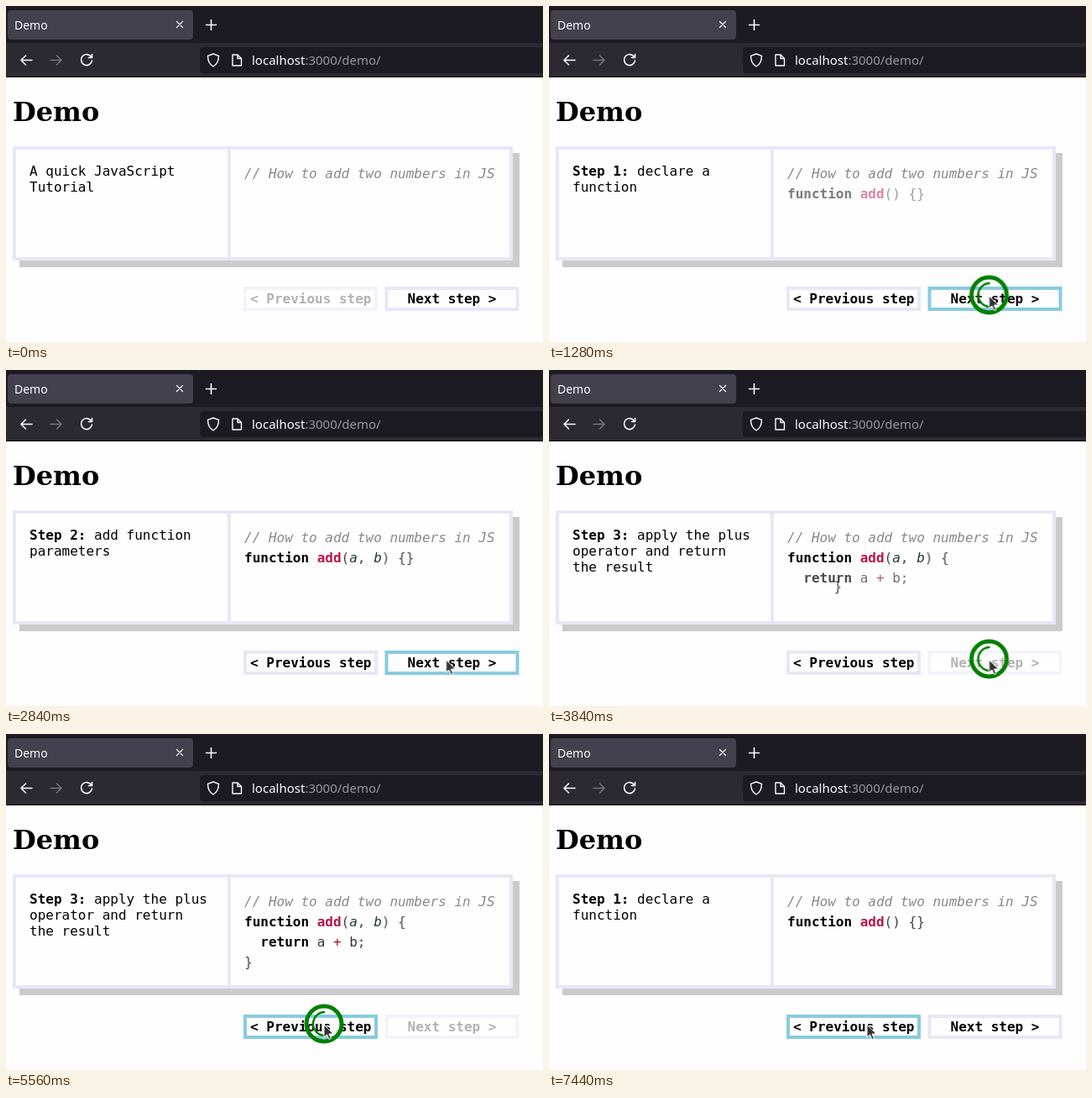
An HTML page for the animation above (8 s loop, 640 by 400 pixels).

```html
<!DOCTYPE html>
<html lang="en">
<head>
<meta charset="utf-8">
<title>Demo</title>
<style>
  html, body { margin: 0; width: 100%; height: 100%; overflow: hidden; background: #fefefe; }
  svg { display: block; width: 100%; height: 100%; }
  text { white-space: pre; }
  .ui { font-family: "Ubuntu", "Noto Sans", sans-serif; fill: #fbfbfe; }
  .mono { font: 16px "DejaVu Sans Mono", monospace; fill: #000; }
  .bold, .keyword, .name { font-weight: bold; }
  .comment { fill: #888; font-style: italic; }
  .keyword { fill: #000; }
  .name { fill: #b8144c; }
  .param { fill: #1e3a2a; font-style: italic; }
  .punct { fill: #444; }
  .plain { fill: #333; }
  .operator { fill: #a01828; }
  .line { fill: none; stroke: #fbfbfe; stroke-width: 1.6; stroke-linecap: round; stroke-linejoin: round; }
  .frame { fill: #fefefe; stroke: #e8e7f7; stroke-width: 4; }
</style>
</head>
<body>
<svg viewBox="0 0 640 400">
  <!-- Browser chrome -->
  <rect width="640" height="44" fill="#1c1b22"/>
  <rect y="44" width="640" height="41" fill="#2b2a33"/>
  <rect y="84" width="640" height="1" fill="#0c0c0d"/>
  <rect x="2" y="5" width="221" height="35" rx="4" fill="#42414d"/>
  <rect x="231" y="49" width="420" height="31" rx="4" fill="#1c1b22"/>
  <text class="ui" x="10" y="28" font-size="14">Demo</text>
  <text class="ui" x="293" y="70" font-size="15">localhost<tspan fill="#98979f">:3000/demo/</tspan></text>
  <g class="line">
    <path d="M203.5 18.5l7 7m0-7l-7 7" stroke-width="1.2"/>
    <path d="M238.5 22.5h12m-6-6v12"/>
    <path d="M31 64.5H18m5.5-5.5l-5.5 5.500 5.500 5.500"/>
    <path d="M53 64.5h13m-5.5-5.5l5.500 5.500-5.500 5.500" stroke="#75747c"/>
    <path d="M101.5 60.5a6.500 6.500 0 1 0 1 4.500M102.500 57.500v4h-4"/>
    <path d="M247 57l6.500 2.300c0 6-1.500 10-6.500 12.700-5-2.700-6.500-6.700-6.500-12.700z" stroke-width="1.4"/>
    <path d="M270 58h6l4.500 4.500v8.500h-10.500zM276 58v4.500h4.500" stroke-width="1.4"/>
  </g>

  <!-- Page -->
  <text x="8" y="137" font-size="32" font-weight="bold" font-family="'DejaVu Serif', 'Noto Serif', serif">Demo</text>
  <rect x="16" y="175" width="596" height="136" fill="#cbcbcb"/>
  <rect class="frame" x="10" y="169" width="592" height="132"/>
  <rect x="264" y="167" width="4" height="136" fill="#e8e7f7"/>
  <g id="notes" class="mono"></g>
  <g id="code" class="mono">
    <text class="comment" x="284" y="205">// How to add two numbers in JS</text>
  </g>
  <g id="prev">
    <rect class="frame" x="285" y="336" width="156" height="25"/>
    <text class="mono bold" x="291" y="354">&lt; Previous step</text>
  </g>
  <g id="next">
    <rect class="frame" x="453.5" y="336" width="156" height="25"/>
    <text class="mono bold" x="478.5" y="354">Next step &gt;</text>
  </g>

  <!-- Pointer -->
  <g id="pointer">
    <g id="click" fill="none" stroke="#008000">
      <circle cy="-1" r="21" stroke-width="5"/>
      <path d="M1-15A14 14 0 1 0 1 13" stroke-width="2.5"/>
    </g>
    <path d="M0 0V15L3.500 12 6 17.500 8.500 16.500 6 11H11Z" fill="#333" stroke="#fff"/>
  </g>
</svg>
<script>
const LOOP = 8000, FADE = 500;
const CHAR = 16 * 1233 / 2048, CODE_X = 284, CODE_Y = 229, LINE = 24;

const changes = [[1130, 1], [2250, 2], [3630, 3], [5730, 2], [6890, 1]];
const clicks = [[960, 1680], [2160, 2840], [3480, 4160], [5560, 6240], [6760, 7440]];

const notes = [
  ["", "A quick JavaScript", "Tutorial"],
  ["Step 1:", " declare a", "function"],
  ["Step 2:", " add function", "parameters"],
  ["Step 3:", " apply the plus", "operator and return", "the result"],
];

// text, class, first step, then [column, row] for that step and each later one
const tokens = [
  ["function", "keyword", 1, [0, 0]],
  ["add", "name", 1, [9, 0]],
  ["(", "punct", 1, [12, 0]],
  [")", "punct", 1, [13, 0], [17, 0]],
  ["{", "punct", 1, [15, 0], [19, 0]],
  ["}", "punct", 1, [16, 0], [20, 0], [0, 2]],
  ["a", "param", 2, [13, 0]],
  [",", "punct", 2, [14, 0]],
  ["b", "param", 2, [16, 0]],
  ["return", "keyword", 3, [2, 1]],
  ["a", "plain", 3, [9, 1]],
  ["+", "operator", 3, [11, 1]],
  ["b", "plain", 3, [13, 1]],
  [";", "punct", 3, [14, 1]],
];

const $ = selector => document.querySelector(selector);

function add(parent, tag, attrs = {}, text = "") {
  const el = document.createElementNS("http://www.w3.org/2000/svg", tag);
  for (const key in attrs) el.setAttribute(key, attrs[key]);
  el.textContent = text;
  return parent.appendChild(el);
}

// Each key is [time, style, easing towards the next key].
function play(el, keys) {
  const last = keys[keys.length - 1];
  const frames = [...keys, [LOOP, last[1]]].map(([time, style, easing = "linear"]) =>
    ({ ...style, offset: time / LOOP, easing }));
  el.animate(frames, { duration: LOOP, iterations: Infinity });
}

const hold = (el, keys) => play(el, keys.map(([time, style]) => [time, style, "step-end"]));

notes.forEach(([title, first, ...rest], step) => {
  const group = add($("#notes"), "g");
  const head = add(group, "text", { x: 28, y: 202 });
  add(head, "tspan", { class: "bold" }, title);
  add(head, "tspan", {}, first);
  rest.forEach((line, i) => add(group, "text", { x: 28, y: 221 + 19 * i }, line));
  hold(group, [[0, 0], ...changes].map(([time, now]) => [time, { opacity: +(now === step) }]));
});

for (const [text, kind, first, ...places] of tokens) {
  const el = add($("#code"), "text", { class: kind }, text);
  const styleAt = step => {
    const index = Math.min(Math.max(step - first, 0), places.length - 1);
    const [column, row] = places[index];
    return {
      opacity: +(step >= first),
      transform: `translate(${CODE_X + column * CHAR}px, ${CODE_Y + row * LINE}px)`,
    };
  };
  const keys = [[0, styleAt(0)]];
  let current = 0;
  for (const [time, step] of changes) {
    keys.push([time, styleAt(current), "ease"], [time + FADE, styleAt(step)]);
    current = step;
  }
  play(el, keys);
}

const looks = {
  normal: ["#e8e7f7", "#000"],
  hover: ["#88cbe0", "#000"],
  disabled: ["#f3f3fb", "#b3b3b3"],
};

function button(id, states) {
  hold($(id + " rect"), states.map(([time, look]) => [time, { stroke: looks[look][0] }]));
  hold($(id + " text"), states.map(([time, look]) => [time, { fill: looks[look][1] }]));
}
button("#prev", [[0, "disabled"], [1130, "normal"], [5030, "hover"]]);
button("#next", [[0, "normal"], [300, "hover"], [3630, "disabled"], [5730, "normal"]]);

const at = (x, y) => ({ transform: `translate(${x}px, ${y}px)` });
play($("#pointer"), [
  [0, at(500, 404)],
  [30, at(500, 402), "ease-in-out"],
  [480, at(524.5, 345)],
  [4780, at(524.5, 345), "ease-in-out"],
  [5200, at(379, 346)],
]);
hold($("#click"), [[0, { opacity: 0 }],
  ...clicks.flatMap(([down, gone]) => [[down, { opacity: 1 }], [gone, { opacity: 0 }]])]);
</script>
</body>
</html>
```
